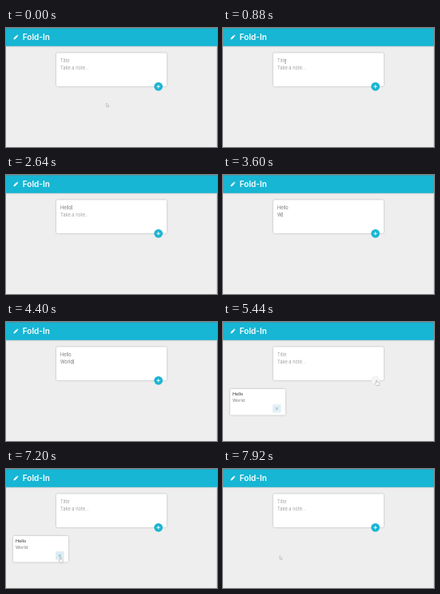
An HTML page for the animation above (8 s loop, 264 by 149 pixels).

```html
<!DOCTYPE html>
<html lang="en">
<head>
<meta charset="utf-8">
<title>Notes</title>
<style>
  html, body { margin: 0; width: 100%; height: 100%; overflow: hidden; background: #eee; }
  svg { display: block; width: 100%; height: 100%; }
  text { font: 400 5.7px Inter, Roboto, sans-serif; fill: #777; }
  .brand { font-size: 10px; font-weight: 600; fill: #fff; }
  .hint { fill: #a0a0a0; }
  .saved { font-size: 5.4px; }
  .strong { font-weight: 500; fill: #444; }
  .card { fill: #fff; filter: drop-shadow(0 .5px .8px #0004); }
  .pointer { fill: #fafafa; stroke: #999; stroke-width: .5; stroke-linejoin: round; }
</style>
</head>
<body>
<svg viewBox="0 0 264 149">
  <rect width="264" height="149" fill="#eee"/>
  <rect width="264" height="22.7" fill="#16b6d4" style="filter: drop-shadow(0 .5px .8px #0004)"/>
  <path d="M0 .5H264" stroke="#3a9fb4"/>
  <path d="M263.5 23V149" stroke="#dadada"/>
  <path d="M9.6 14.2V12.7L13 9.3 14.5 10.8 11.1 14.2ZM13.4 8.9 14 8.3 15.5 9.8 14.9 10.4Z" fill="#fff"/>
  <text class="brand" x="20.8" y="15.4">Fold-In</text>

  <rect class="card" x="63" y="31.2" width="138" height="41.8" rx="1.8"/>
  <text id="title" x="68" y="42.7"></text>
  <text id="body" x="68" y="51.9"></text>
  <path id="caret" stroke="#555" stroke-width=".6"/>

  <g id="add">
    <circle cx="190.7" cy="73.3" r="5.3" style="filter: drop-shadow(0 .4px .5px #0003)"/>
    <path id="plus" d="M188.5 73.3h4.4M190.7 71.1v4.4" stroke="#fff" stroke-width=".9"/>
  </g>

  <g id="note">
    <rect class="card" x="9" y="84" width="69" height="32.5" rx="1.5"/>
    <text class="saved strong" x="12" y="92.3">Hello</text>
    <text class="saved" x="12" y="99.9">World</text>
    <rect id="remove" x="62" y="103.2" width="10.6" height="10.4" rx="1"/>
    <path d="m65.7 106.8 3.2 3.2m0-3.2-3.2 3.2" stroke="#6fa3b5" stroke-width=".7"/>
  </g>

  <g id="mouse">
    <path id="arrow" class="pointer" d="M0 0V4.6L1.1 3.7 1.8 5.2 2.6 4.8 1.9 3.4H3.3Z"/>
    <path id="beam" d="M-1-2.5h2M0-2.5v5M-1 2.5h2" stroke="#888" stroke-width=".5"/>
    <path id="hand" class="pointer" d="M-.6 4V.5Q0-.4.6.5V2.5L2.8 3.1Q3.6 3.4 3.4 4.5L2.8 7H0L-2 4.6Q-1.8 3.4-.6 4Z"/>
  </g>
</svg>
<script>
const $ = id => document.getElementById(id);
const show = (id, on) => $(id).style.display = on ? '' : 'none';
const LOOP = 8000, STEP = 80;

// Pointer stops: time, x, y
const path = [
  [0, 125.7, 94], [80, 125.7, 94], [880, 78, 42], [1200, 72, 40.5],
  [4480, 72, 40.5], [5120, 192.3, 72.6], [5520, 192.3, 72.6],
  [6800, 68, 110.2], [7280, 68, 110.2], [7840, 71, 108.5], [LOOP, 71, 108.5]
];
const titleKeys = [1680, 1920, 2160, 2320, 2560];
const bodyKeys = [3600, 3760, 3920, 4080, 4240];

function pointerAt(t) {
  const i = path.findIndex(p => p[0] > t);
  const [t0, x0, y0] = path[i - 1], [t1, x1, y1] = path[i];
  const k = (t - t0) / (t1 - t0), e = k * k * (3 - 2 * k);
  return [x0 + (x1 - x0) * e, y0 + (y1 - y0) * e];
}

const typed = (word, keys, t) => word.slice(0, keys.filter(k => k <= t).length);

function fill(id, word, hint) {
  $(id).textContent = word || hint;
  $(id).setAttribute('class', word ? '' : 'hint');
}

function draw(t) {
  const saved = t >= 5280, hasNote = saved && t < 7280;
  const title = saved ? '' : typed('Hello', titleKeys, t);
  const body = saved ? '' : typed('World', bodyKeys, t);
  fill('title', title, 'Title');
  fill('body', body, 'Take a note...');

  const inBody = t >= 2800;
  const word = inBody ? body : title;
  const width = word ? $(inBody ? 'body' : 'title').getComputedTextLength() : 0;
  $('caret').setAttribute('d', `M${68.5 + width} ${inBody ? 46.7 : 37.5}v6`);
  show('caret', t >= 1280 && !saved);

  const [x, y] = pointerAt(t);
  const onAdd = Math.hypot(x - 190.7, y - 73.3) < 5.3;
  const onRemove = hasNote && x > 62 && x < 72.6 && y > 103.2 && y < 113.6;
  const onText = x > 67 && x < 197 && y > 36 && y < 54;
  const onHand = onAdd || onRemove;
  $('add').setAttribute('fill', onAdd ? '#f5f5f5' : '#16b6d4');
  show('plus', !onAdd);
  $('remove').setAttribute('fill', onRemove ? '#dcedf3' : '#e2f0f5');
  show('note', hasNote);

  $('mouse').setAttribute('transform', `translate(${x} ${y})`);
  show('mouse', t < 1680 || t >= 4480);
  show('arrow', !onHand && !onText);
  show('beam', onText && !onHand);
  show('hand', onHand);
}

function tick() {
  draw(Math.floor(performance.now() % LOOP / STEP) * STEP);
  requestAnimationFrame(tick);
}
tick();
</script>
</body>
</html>
```
